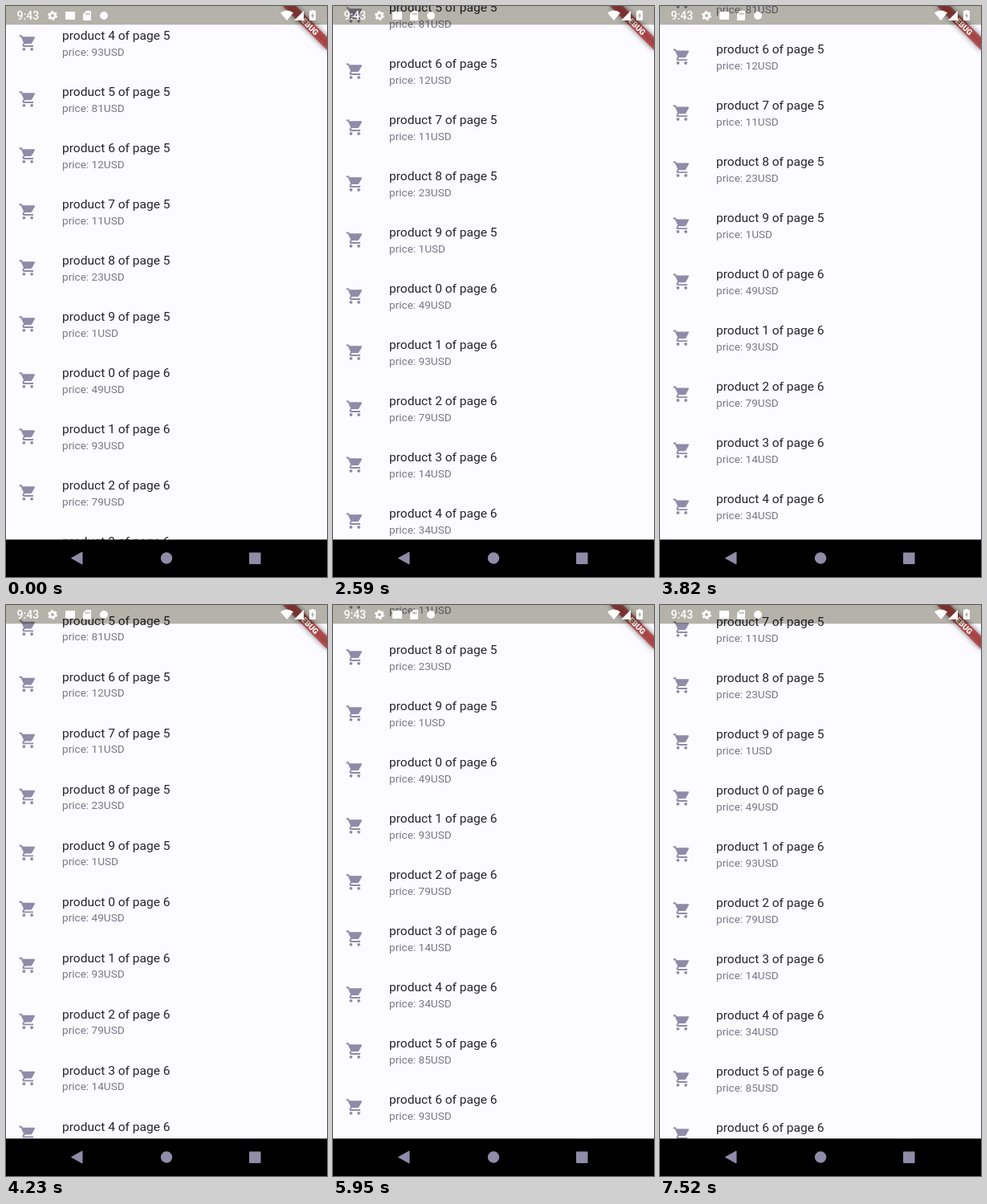
An HTML page for the animation above (8170 ms loop, 400 by 711 pixels).

```html
<!DOCTYPE html>
<html lang="en">
<head>
<meta charset="utf-8">
<title>Product list</title>
<style>
  html, body { margin: 0; height: 100%; overflow: hidden; background: #fcfbff; }
  svg { display: block; width: 100vw; height: 100vh; font-family: Roboto, sans-serif; }
  .title { font-size: 15.56px; fill: #24232a; }
  .price { font-size: 13.6px; fill: #7a778a; }
  .tint { fill: #b6b5a9; mix-blend-mode: multiply; }
</style>
</head>
<body>
<svg viewBox="0 0 400 711">
  <defs>
    <path id="cart" fill="#8f8ba8" d="M7 18c-1.1 0-1.99.9-1.99 2S5.9 22 7 22s2-.9 2-2-.9-2-2-2zM1 2v2h2l3.6 7.59-1.35 2.45c-.16.28-.25.61-.25.96 0 1.1.9 2 2 2h12v-2H7.42c-.14 0-.25-.11-.25-.25l.03-.12.9-1.63h7.45c.75 0 1.41-.41 1.75-1.03l3.58-6.49c.08-.14.12-.31.12-.48 0-.55-.45-1-1-1H5.21l-.94-2H1zm16 16c-1.1 0-1.99.9-1.99 2s.89 2 1.99 2 2-.9 2-2-.9-2-2-2z"/>
    <filter id="blur" x="-20%" y="-150%" width="140%" height="400%"><feGaussianBlur stdDeviation="3.6"/></filter>
  </defs>
  <rect width="400" height="711" fill="#fcfbff"/>
  <g id="list"></g>

  <g transform="translate(400 0) rotate(45)">
    <rect x="-39" y="27.2" width="78" height="11.7" fill="#000" opacity=".5" filter="url(#blur)"/>
    <rect x="-39" y="27.2" width="78" height="11.7" fill="#b71c1c" opacity=".63"/>
    <text y="36.6" text-anchor="middle" font-size="9.9" font-weight="900" fill="#fff">DEBUG</text>
  </g>

  <rect class="tint" width="400" height="23.3"/>
  <g fill="#fff">
    <text x="13.5" y="17" font-size="14" font-weight="500">9:43</text>
    <g fill="none" stroke="#fff">
      <circle cx="58" cy="12" r="3.4" stroke-width="2.6"/>
      <circle cx="58" cy="12" r="5.2" stroke-width="1.8" stroke-dasharray="2.72"/>
    </g>
    <rect x="74" y="7" width="12" height="10"/>
    <path fill-rule="evenodd" d="M100 6h5q1 0 1 1v10q0 1-1 1h-8q-1 0-1-1V10zM99 8.5v2.5h1.3V8.5zm2 0v2.5h1.3V8.5zm2 0v2.5h1.3V8.5z"/>
    <circle cx="122" cy="12" r="5"/>
    <path d="M342 8.500Q350 2.500 358 8.500L350 18z"/>
    <path d="M371 6V18H359z"/>
    <path fill-rule="evenodd" d="M380.500 6V5h3v1h1.700q.8 0 .8.8v10.400q0 .8-.8.8h-6.400q-.8 0-.8-.8V6.800q0-.8.8-.8zM382.600 8l-2.600 4.800h1.600V16l2.600-4.800h-1.600z"/>
  </g>

  <rect y="664.4" width="400" height="46.600"/>
  <g fill="#8f8ca8">
    <path d="M81.500 687.500L95 680v15z" stroke="#8f8ca8" stroke-linejoin="round"/>
    <circle cx="200" cy="687.500" r="7.200"/>
    <rect x="303" y="680.500" width="14.500" height="14.500" rx="1"/>
  </g>
</svg>
<script>
const LOOP = 8170, STEP = 40.9, ROW = 70;
const list = document.getElementById('list');
const prices = [27, 93, 81, 12, 11, 23, 1, 49, 93, 79, 14, 34, 85, 93];

list.innerHTML = prices.map((price, i) => {
  const n = i + 53;
  return `<g transform="translate(0 ${(i - 1) * ROW})">
    <use href="#cart" transform="translate(15.56 34.4) scale(.972)"/>
    <text class="title" x="70" y="42.2">product ${n % 10} of page ${Math.floor(n / 10)}</text>
    <text class="price" x="70" y="61.8">price: ${price}USD</text></g>`;
}).join('');

const linear = p => p;
const out = p => 1 - (1 - p) ** 2;
const inOut = p => p * p * (3 - 2 * p);

// Each move: start time, then [time since start, scroll offset, easing]
const moves = [
  [0, [0, 0]],
  [40, [0, -2], [740, -15.5, out], [1190, -16, linear]],
  [2010, [0, -13], [81, -4, linear], [900, 164, inOut]],
  [3410, [0, 158], [818, 87.6, linear], [1104, 34, out]],
  [5500, [0, 36.4], [449, 261, inOut]],
  [6820, [0, 260], [695, 226, inOut]]
];

function scrollAt(t) {
  const [start, ...keys] = moves.findLast(m => m[0] <= t);
  const d = Math.floor((t - start) / STEP) * STEP;
  const i = keys.findIndex(k => k[0] > d);
  if (i < 0) return keys.at(-1)[1];
  const [t0, a] = keys[i - 1], [t1, b, ease] = keys[i];
  return a + (b - a) * ease((d - t0) / (t1 - t0));
}

function draw() {
  const y = -scrollAt(performance.now() % LOOP);
  list.setAttribute('transform', `translate(0 ${y.toFixed(2)})`);
  requestAnimationFrame(draw);
}
draw();
</script>
</body>
</html>
```
